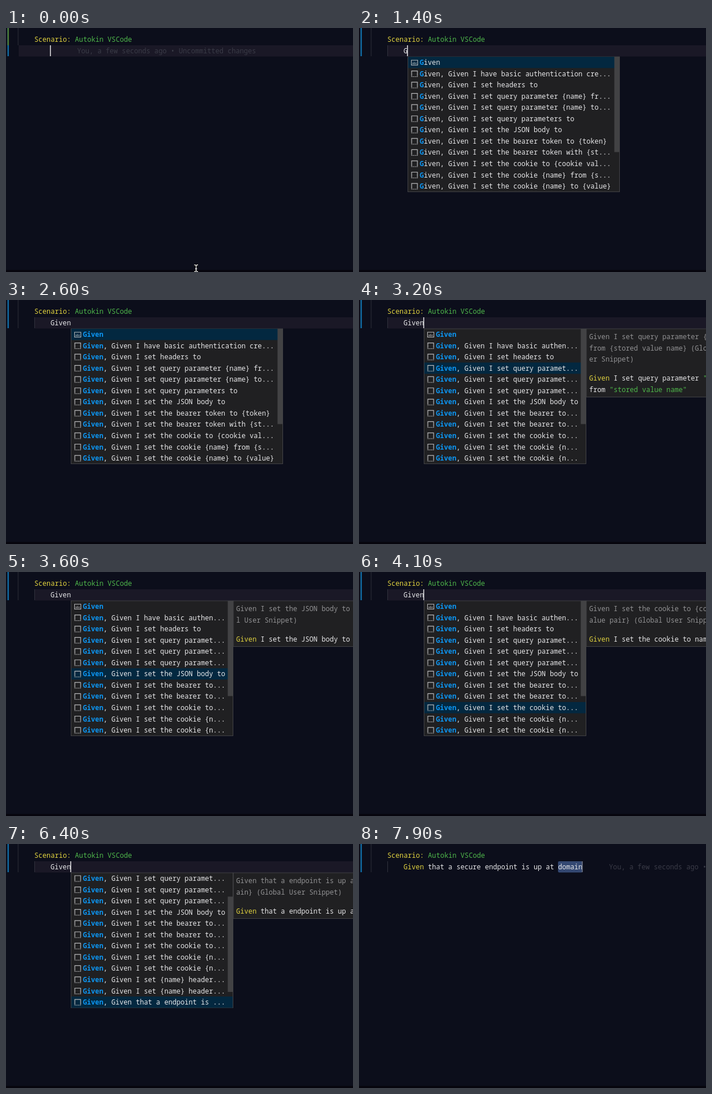
Animation of 600x424 px, one loop 8 s. Source, as an HTML page:

```html
<!DOCTYPE html>
<html lang="en">
<head>
<meta charset="utf-8">
<title>Step completion</title>
<style>
  html, body { margin: 0; width: 100%; height: 100%; overflow: hidden; background: #0c0e1b; }
  svg { display: block; width: 600px; height: 424px; }
  text { font: 11.72px "Noto Sans Mono", "DejaVu Sans Mono", monospace; white-space: pre; fill: #e8e8ea; }
  .key { fill: #e0d23f; }
  .str { fill: #4fb84b; }
  .hit { fill: #0c97f5; font-weight: 700; }
  .dim { fill: #929294; }
  .blame { fill: #3a3b47; }
  .box { fill: #202022; stroke: #434346; }
</style>
</head>
<body>
<svg id="stage" viewBox="0 0 600 424"></svg>
<script>
const LOOP = 8000, CHAR = 7.03, ROW = 19.55, TOP = 50, ROWS = 12, TOTAL = 17;
const TYPED_AT = [1400, 1600, 1700, 1800, 2000];
const DOWN_AT = [2700, 2900, 3200, 3300, 3500, 3600, 3800, 3900, 4100,
  4500, 4900, 5300, 5800, 6300, 6800];
const INSERT_AT = 7400, BLAME_AT = 7800, DIM_AT = 7900;

const STEPS = [
  'I have basic authentication credentials {username} and {password}',
  'I set headers to',
  'I set query parameter {name} from {stored value name}',
  'I set query parameter {name} to {value}',
  'I set query parameters to',
  'I set the JSON body to',
  'I set the bearer token to {token}',
  'I set the bearer token with {stored value name}',
  'I set the cookie to {cookie value pair}',
  'I set the cookie {name} from {stored value name}',
  'I set the cookie {name} to {value}',
  'I set {name} header from {stored value name}',
  'I set {name} header to {value}',
  'that a endpoint is up at {domain}',
  'that a secure endpoint is up at {domain}'
].map(s => 'Given ' + s);

const stage = document.getElementById('stage');
const count = (times, t) => times.filter(x => t >= x).length;
const rect = (x, y, w, h, fill) => `<rect x="${x}" y="${y}" width="${w}" height="${h}" fill="${fill}"/>`;
const box = (x, y, w, h) => `<rect class="box" x="${x + .5}" y="${y + .5}" width="${w - 1}" height="${h - 1}"/>`;
const span = (cls, s) => `<tspan class="${cls}">${s}</tspan>`;
const text = (x, y, s, cls = '') => `<text class="${cls}" x="${x}" y="${y + 4}">${s}</text>`;
const cut = (s, n) => s.length > n ? s.slice(0, n - 3) + '...' : s;

function wrapWords(s, width) {
  const lines = [''];
  for (const word of s.split(' ')) {
    const last = lines[lines.length - 1];
    if (!last) lines[lines.length - 1] = word;
    else if (last.length + 1 + word.length <= width) lines[lines.length - 1] += ' ' + word;
    else lines.push(word);
  }
  return lines;
}

function snippetBody(step) {
  return step.replace('{cookie value pair}', 'name=value')
    .replace(/{(.*?)}/g, step.includes('query') ? '"$1"' : '$1');
}

function icon(x, y, isWord) {
  if (isWord) {
    return `<rect x="${x + .5}" y="${y - 4}" width="11" height="8.5" fill="none" stroke="#b9b9bb"/>
      <text x="${x + 1.8}" y="${y + 2.5}" style="font-size:5px;fill:#d0d0d2">abc</text>`;
  }
  return `<path d="M${x + 1} ${y + 4}V${y - 5}H${x + 11}V${y + 4}" fill="none" stroke="#b8b8ba" stroke-width="1.2"/>
    <path d="M${x + .5} ${y + 5}h11" stroke="#b8b8ba" stroke-dasharray="2 1"/>`;
}

function list(x, typed, sel) {
  const wide = sel === 0, w = wide ? 367 : 281, chars = wide ? 47 : 35;
  const first = Math.max(0, sel - ROWS + 1), h = ROWS * ROW;
  let out = box(x, TOP - .5, w, h + 1) +
    rect(x + 1, TOP + (sel - first) * ROW, w - 2, ROW, '#032840');
  for (let i = 0; i < ROWS; i++) {
    const n = first + i, y = 60 + i * ROW;
    const label = n ? cut('Given, ' + STEPS[n - 1], chars) : 'Given';
    out += icon(x + 6, y, !n) +
      text(x + 21, y, span('hit', label.slice(0, typed)) + label.slice(typed));
  }
  return out + rect(x + w - 9.5, TOP + first * h / TOTAL, 9, h * ROWS / TOTAL, '#424244');
}

function details(step) {
  const about = (step + ' (Global User Snippet)').match(/.{1,35}/g);
  const body = wrapWords(snippetBody(step), 38);
  const aboutY = 64, bodyY = aboutY + (about.length - 1) * ROW + 33;
  const bottom = bodyY + (body.length - 1) * ROW + 13.5;
  const paint = s => s.replace(/"[^"]*"/g, m => span('str', m));
  return box(392.5, TOP - .5, 270, bottom - TOP + .5) +
    about.map((s, i) => text(398, aboutY + i * ROW, s, 'dim')).join('') +
    body.map((s, i) => text(398, bodyY + i * ROW,
      i ? paint(s) : span('key', 'Given') + paint(s).slice(5))).join('');
}

function pointer() {
  const d = 'M325.5 411.5q3 0 3.2 2v8q-.2 2-3.2 2M332 411.5q-3 0-3.3 2M332 423.5q-3 0-3.3-2M327 418.5h3.4';
  return `<path d="${d}" fill="none" stroke="#000" stroke-width="3"/>
    <path d="${d}" fill="none" stroke="#eee" stroke-width="1.3"/>`;
}

function draw({ typed, sel, done, blame, caret }) {
  const idle = !typed, lineX = idle ? 22 : 50;
  let out = rect(0, 0, 600, 424, '#0c0e1b') + rect(0, 420.5, 600, 3.5, '#06050d');
  if (!done) out += rect(lineX, 30, 600 - lineX, 19.5, '#1a1826');
  out += rect(2.5, 0, 2.5, 49, '#10689f');
  if (idle) out += rect(2.5, 0, 2.5, 30, '#4c7a35');
  out += rect(20.5, 0, 1, idle ? 30 : 49, '#2c2e3a');
  if (!idle) out += rect(49, 30, 1, 19, '#30313c');
  out += text(49, 20, span('key', 'Scenario:') + span('str', ' Autokin VSCode'));

  const line = done ? snippetBody(STEPS[STEPS.length - 1]) : 'Given'.slice(0, typed);
  const end = 77 + line.length * CHAR;
  if (done) {
    out += `<rect x="${end - 6 * CHAR}" y="30" width="${6 * CHAR}" height="19.5" rx="2" fill="#344872"/>`;
  }
  out += text(77, 40, done ? span('key', 'Given') + line.slice(5) : line);
  if (blame) out += text(end + 46, 40, 'You, a few seconds ago • Uncommitted changes', 'blame');
  if (caret) out += rect(end - 1, 30, 1.5, 19, caret > 1 ? '#e4e4e6' : '#707686');
  if (!idle && !done) {
    out += list(Math.round(end), typed, sel);
    if (sel) out += details(STEPS[sel - 1]);
  }
  if (idle) out += pointer();
  stage.innerHTML = out;
}

function stateAt(t) {
  const typed = count(TYPED_AT, t), done = t >= INSERT_AT;
  const typing = t >= TYPED_AT[0] && t < TYPED_AT[4] + 500;
  const lit = done ? t < DIM_AT : typing || t % 1000 < 500;
  return {
    typed, done,
    sel: count(DOWN_AT, t),
    blame: !typed || t >= BLAME_AT,
    caret: lit ? 2 : done ? 1 : 0
  };
}

let shown = '';
function tick() {
  const state = stateAt(performance.now() % LOOP), key = JSON.stringify(state);
  if (key !== shown) {
    shown = key;
    draw(state);
  }
  requestAnimationFrame(tick);
}
tick();
</script>
</body>
</html>
```
